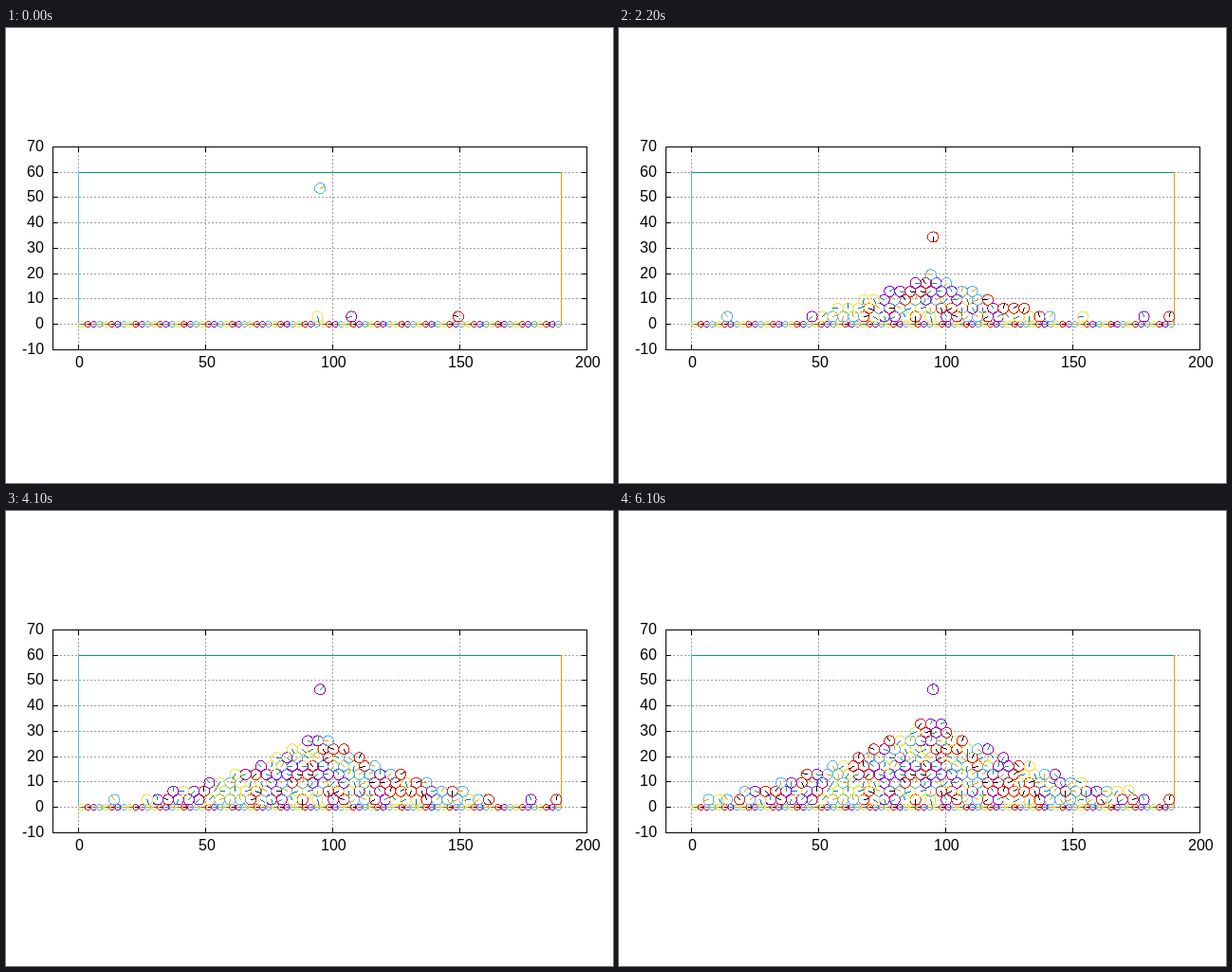
These frames come from a looping animation (640x480 px, 6200 ms). An HTML page with a canvas:

```html
<!DOCTYPE html>
<html>
<head>
<meta charset="utf-8">
<style>
html, body { margin: 0; width: 100%; height: 100%; overflow: hidden; background: #fff; }
canvas { display: block; }
</style>
</head>
<body>
<canvas id="stage" width="640" height="480"></canvas>
<script>
const ctx = document.getElementById('stage').getContext('2d');
const STEP = 100, STEPS = 62, RATE = 3.2;   // RATE: grains released per step
const SOURCE_X = 95, SOURCE_Y = 56, DROP = 60, ROLL = 42;
const HEAP_X = 94.2, PITCH = 4.07, ROW = 3.31;
const RUNAWAYS = [94, 188, 178, 14, 154];   // the first grains roll far away
// Rim and spoke colours repeat every four grains
const COLORS = [['#f0e442', '#0072b2'], ['#e51e10', '#000'], ['#9400d3', '#009e73'], ['#56b4e9', '#e69f00']];

const px = x => 76.5 + 2.68 * x;
const py = y => 312.5 - 2.675 * y;
const noise = i => { const s = Math.sin(i * 12.9898 + 4.1) * 43758.5453; return s - Math.floor(s); };

// The heap keeps its shape while width and height grow with the square root of time
function halfWidth(row, time) {
  const size = Math.sqrt(time);
  return 11.7 * size * Math.max(0, 1 - row / (1.48 * size)) ** 1.7;
}

function fillTime(row, x) {
  let time = 0.05;
  while (time < 80 && halfWidth(row, time) <= Math.abs(x - HEAP_X)) time += 0.05;
  return time;
}

function buildGrains() {
  const slots = RUNAWAYS.map(x => ({ x, y: 3, time: 0 }));
  for (let row = 0; row < 11; row++) {
    for (let k = -23; k <= 23; k++) {
      const x = HEAP_X + (k - 0.5 + (row % 2) / 2) * PITCH;
      const taken = row === 0 && RUNAWAYS.some(r => Math.abs(r - x) < 2.3);
      if (x > 2 && x < 188 && !taken) slots.push({ x, y: 3 + row * ROW, time: fillTime(row, x) });
    }
  }
  return slots.sort((a, b) => a.time - b.time);
}

const grains = buildGrains();

// Height of a grain resting at x on the first `count` grains
function surface(x, count) {
  let top = 3;
  for (let i = 0; i < count; i++) {
    const dx = Math.abs(grains[i].x - x);
    if (dx < 4) top = Math.max(top, grains[i].y + Math.sqrt(16 - dx * dx));
  }
  return top;
}

grains.forEach((g, j) => {
  g.land = Math.sqrt(Math.max(0, SOURCE_Y - surface(SOURCE_X, j)) / DROP);
  g.rest = g.land + Math.abs(g.x - SOURCE_X) / ROLL;
  g.spin = noise(j) * 10 - 5;
});

function pose(j, age) {
  const g = grains[j];
  const angle = -0.15 + g.spin * Math.min(age, g.rest);
  if (age < g.land) return [SOURCE_X, SOURCE_Y - DROP * age * age, angle];
  if (age >= g.rest) return [g.x, g.y, angle];
  const x = SOURCE_X + Math.sign(g.x - SOURCE_X) * ROLL * (age - g.land);
  return [x, surface(x, j), angle];
}

function line(x1, y1, x2, y2, color) {
  ctx.strokeStyle = color;
  ctx.beginPath();
  ctx.moveTo(x1, y1);
  ctx.lineTo(x2, y2);
  ctx.stroke();
}

const dot = (x, y) => ctx.fillRect(Math.floor(x), Math.floor(y), 1, 1);

// Hard-edged circle with a spoke
function disc(x, y, r, angle, index) {
  const [rim, spoke] = COLORS[index % 4];
  const cx = px(x), cy = py(y);
  ctx.fillStyle = rim;
  for (let a = 0; a <= r * 0.75; a++) {
    const b = Math.sqrt(r * r - a * a);
    for (const sx of [-1, 1]) for (const sy of [-1, 1]) {
      dot(cx + sx * a, cy + sy * b);
      dot(cx + sx * b, cy + sy * a);
    }
  }
  ctx.fillStyle = spoke;
  const dx = Math.cos(angle), dy = -Math.sin(angle);
  const stride = 1 / Math.max(Math.abs(dx), Math.abs(dy));
  for (let d = 0; d <= r; d += stride) dot(cx + dx * d, cy + dy * d);
}

function label(value, x, y, align) {
  const left = Math.round(x - ctx.measureText(value).width * align);
  ctx.fillText(value, left, y);
}

function drawAxes() {
  ctx.font = '16px "Liberation Sans", Arial, sans-serif';
  ctx.fillStyle = '#000';
  for (let v = 0; v <= 200; v += 50) {
    const x = px(v);
    ctx.setLineDash([2, 2]);
    line(x, 340, x, 126, '#a0a0a0');
    ctx.setLineDash([]);
    line(x, 339, x, 334, '#000');
    line(x, 126, x, 131, '#000');
    label(v, x + 1, 358, 0.5);
  }
  for (let v = -10; v <= 70; v += 10) {
    const y = Math.floor(py(v)) + 0.5;
    ctx.setLineDash([2, 2]);
    line(49, y, 612, y, '#a0a0a0');
    ctx.setLineDash([]);
    line(50, y, 55, y, '#000');
    line(612, y, 607, y, '#000');
    label(v, 40, y + 4.5, 1);
  }
}

function draw(step) {
  ctx.fillStyle = '#fff';
  ctx.fillRect(0, 0, 640, 480);
  drawAxes();

  line(76, 152.5, 586, 152.5, '#009e73');
  line(76.5, 152, 76.5, 312, '#56b4e9');
  line(585.5, 152, 585.5, 312, '#e69f00');
  line(76, 312.5, 586, 312.5, '#e69f00');

  for (let i = 0; i < 80; i++) disc((i + 0.5) * 2.375, 0, 3, 0, i);
  const clock = (step + 1) * RATE;
  const last = Math.min(Math.floor(clock + 1e-6), grains.length - 1);
  for (let j = 0; j <= last; j++) {
    const [x, y, angle] = pose(j, Math.max(0, clock - j));
    disc(x, y, 5.5, angle, j);
  }

  ctx.strokeStyle = '#000';
  ctx.strokeRect(49.5, 125.5, 563, 214);
}

let shown = -1;
function tick() {
  const step = Math.floor(performance.now() / STEP) % STEPS;
  if (step !== shown) draw(shown = step);
  requestAnimationFrame(tick);
}
tick();
</script>
</body>
</html>
```
